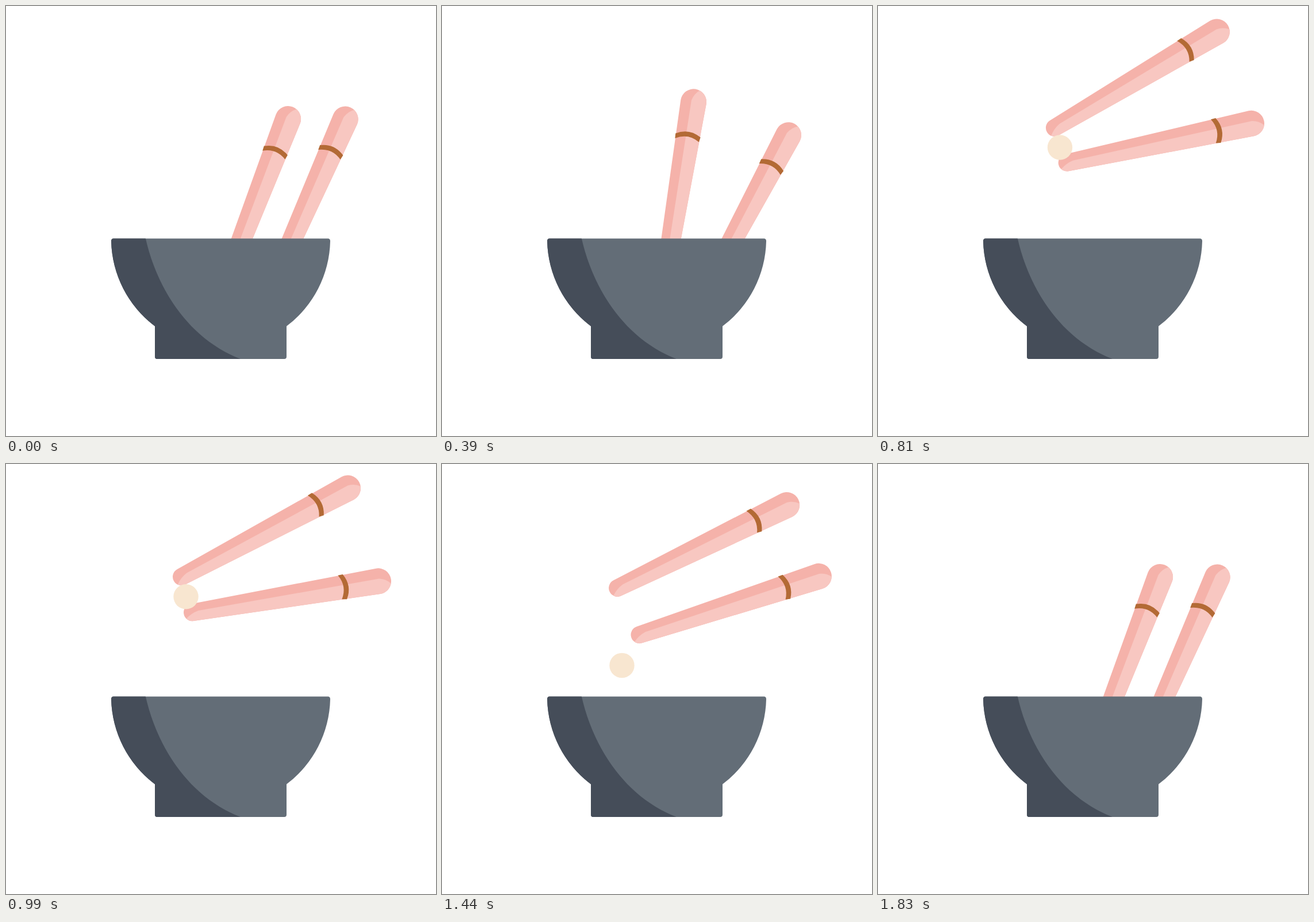
An HTML page for the animation above (3860 ms loop, 748 by 748 pixels).

```html
<!DOCTYPE html>
<html lang="en">
<head>
<meta charset="utf-8">
<title>Bowl and chopsticks</title>
<style>
  html, body { margin: 0; width: 100%; height: 100%; overflow: hidden; background: #fff; }
  svg { display: block; width: 100%; height: 100%; }
</style>
</head>
<body>
<svg viewBox="0 0 748 748">
  <defs>
    <!-- upright stick, cap centre at the origin, tip centre 328 below -->
    <g id="stick">
      <path fill="#f5b2aa" d="M-22.5 0A22.5 22.5 0 0 1 22.5 0L15 328A15 15 0 0 1 -15 328Z"/>
      <path fill="#f8c7c1" d="M7.5 -21.2Q-1.5 -14 -4 -2L-1.5 317Q1 330 9 340Q15 336 15 328L22.5 0A22.5 22.5 0 0 0 7.5 -21.2Z"/>
      <path fill="#b36a35" d="M-22 59Q0 46 22 59L20.5 67.5Q0 55 -21.5 67.5Z"/>
    </g>
    <path id="bowl" d="M187 404.5H560Q564 404.5 564 409A190.5 190.5 0 0 1 488 557V610Q488 614 484 614H263Q259 614 259 610V557A190.5 190.5 0 0 1 183 409Q183 404.5 187 404.5Z"/>
    <clipPath id="inside"><use href="#bowl"/></clipPath>
  </defs>
  <g id="right"><use href="#stick" y="-328"/></g>
  <g id="left"><use href="#stick" y="-328"/></g>
  <circle id="ball" r="21.7" fill="#f8e6d0"/>
  <use href="#bowl" fill="#636d77"/>
  <path clip-path="url(#inside)" fill="#454d59" d="M180 400H242Q242 402 243 405C264 496 320 580 408 614V620H180Z"/>
</svg>
<script>
const LOOP = 3860, STEP = 30;
const GRIP = 35.5, GRIP_ANGLE = 15, GRAVITY = 0.0022;

const easeIn = power => u => u ** power;
const easeOut = power => u => 1 - (1 - u) ** power;
const smooth = u => u * u * (3 - 2 * u);

// Each stick is [tip x, tip y, tilt]; ease leads into the pose.
const rest = { left: [372.5, 502.5, 21.1], right: [457.5, 497, 23.85] };
const poses = [
  { at: 0, ...rest },
  { at: 390, ease: smooth, left: [384.5, 490.5, 9.3], right: [448, 514, 28.1] },
  { at: 630, ease: easeIn(1.6), left: [320, 318, 42.1], right: [360, 370, 61.2] },
  { at: 1080, ease: easeOut(4), left: [305, 196, 62], right: [324, 258, 80.5] },
  { at: 1170, ease: smooth, left: [304, 156, 71.1], right: [323, 251, 81.8] },
  { at: 1620, ease: easeIn(2), left: [307, 322, 51.1], right: [380, 379, 54.4] },
  { at: 1830, ease: easeOut(1.5), ...rest }
];
const HOLD = 1080, DROP = 1110;

function pose(side, t) {
  const i = poses.findIndex(p => p.at > t);
  if (i < 0) return rest[side];
  const from = poses[i - 1], to = poses[i];
  const k = to.ease((t - from.at) / (to.at - from.at));
  return from[side].map((v, n) => v + (to[side][n] - v) * k);
}

// The ball hangs under the left tip, then falls back into the bowl.
function ballAt(t) {
  const [x, y, tilt] = pose("left", Math.min(t, HOLD));
  const angle = (tilt + GRIP_ANGLE) * Math.PI / 180;
  const fall = GRAVITY / 2 * Math.max(0, t - DROP) ** 2;
  return [x + GRIP * Math.cos(angle), Math.min(560, y + GRIP * Math.sin(angle) + fall)];
}

const byId = id => document.getElementById(id);
function place(id, x, y, tilt = 0) {
  byId(id).setAttribute("transform", `translate(${x} ${y}) rotate(${tilt})`);
}

function draw(t) {
  place("left", ...pose("left", t));
  place("right", ...pose("right", t));
  place("ball", ...ballAt(t));
}

const start = performance.now();
function tick() {
  const t = Math.max(0, performance.now() - start) % LOOP;
  draw(Math.floor(t / STEP) * STEP);
  requestAnimationFrame(tick);
}
draw(0);
requestAnimationFrame(tick);
</script>
</body>
</html>
```
